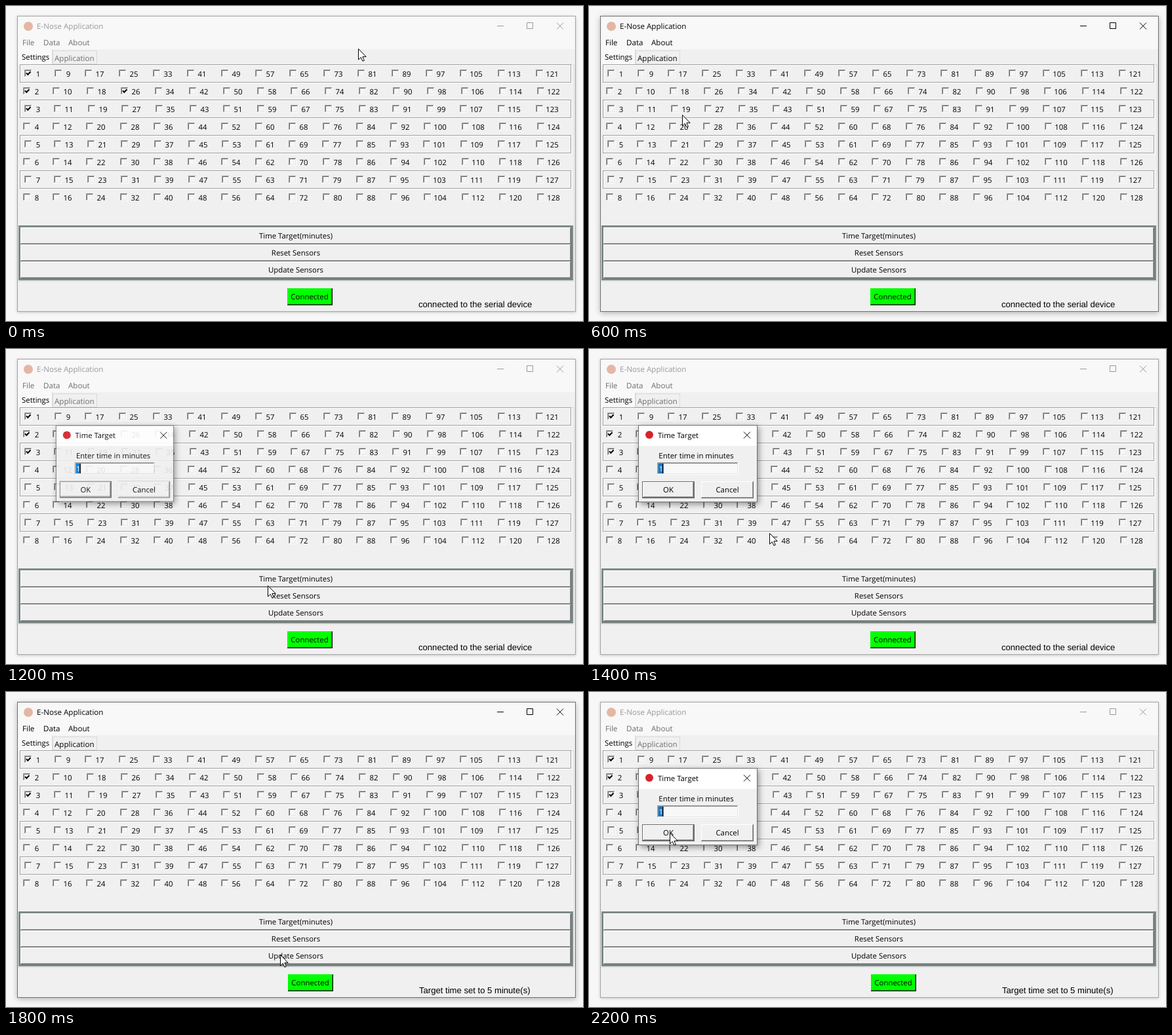
Write an HTML page that moves like this. It is 880 px wide and 481 px high and loops after 2400 ms.

```html
<!DOCTYPE html>
<html lang="en">
<head>
<meta charset="utf-8">
<title>E-Nose Application</title>
<style>
  html, body { margin: 0; width: 100%; height: 100%; overflow: hidden; background: #f7f7f7; }
  svg { display: block; width: 880px; height: 481px; }
  text {
    font: 11.4px "Open Sans", "Noto Sans", sans-serif;
    fill: #000; white-space: pre; text-rendering: geometricPrecision;
  }
  #frame { fill: #f0f0f0; stroke: #6e6e6e; filter: drop-shadow(0 2px 4px rgba(0,0,0,.28)); }
  .inactive #frame { stroke: #a4a4a4; filter: drop-shadow(0 1px 2px rgba(0,0,0,.2)); }
  .title, .menu { font-size: 11.6px; }
  .inactive .title { fill: #999; }
  .inactive .menu { fill: #6d6d6d; }
  .middle { text-anchor: middle; }
  .glyph { fill: none; stroke: #000; }
  .inactive .glyph { stroke: #999; }
  #popup { filter: drop-shadow(2px 3px 5px rgba(0,0,0,.42)); }
  .status { font: 13.1px "Liberation Sans", Arial, sans-serif; }
</style>
</head>
<body>
<svg id="stage" viewBox="0 0 880 481"></svg>
<script>
const NS = "http://www.w3.org/2000/svg";
const stage = document.getElementById("stage");

function add(parent, tag, attrs, content) {
  const node = document.createElementNS(NS, tag);
  for (const key in attrs) node.setAttribute(key, attrs[key]);
  if (content !== undefined) node.textContent = content;
  parent.appendChild(node);
  return node;
}
const rect = (p, x, y, width, height, fill, more) =>
  add(p, "rect", { x, y, width, height, fill, ...more });
const label = (p, x, y, str, name = "") => add(p, "text", { x, y, class: name }, str);
const line = (p, d, stroke, width = 1) =>
  add(p, "path", { d, stroke, fill: "none", "stroke-width": width });

// Two-pixel bevel: light and dark edges around a flat face.
function bevel(p, x, y, w, h, face, light, dark, shade) {
  rect(p, x, y, w, h, dark);
  rect(p, x, y, w - 1, h - 1, light);
  rect(p, x + 1, y + 1, w - 2, h - 2, shade);
  rect(p, x + 1, y + 1, w - 3, h - 3, face);
}

function button(p, x, y, w, h, str) {
  bevel(p, x, y, w, h, "#f0f0f0", "#fff", "#696969", "#a0a0a0");
  label(p, x + w / 2, y + h / 2 + 4, str, "middle");
}

function checkbox(p, x, y) {
  bevel(p, x, y, 12, 12, "#f6f6f6", "#a0a0a0", "#fdfdfd", "#e6e6e6");
  line(p, `M${x + 1.5} ${y + 10}V${y + 1.5}H${x + 10}`, "#696969");
  return line(p, `M${x + 3} ${y + 5.2}l2.3 2.5l4.2 -4.4`, "#000", 2);
}

// Main window
const win = add(stage, "g", {});
rect(win, 17.5, 15.5, 851, 451, "#f0f0f0", { id: "frame" });
rect(win, 18, 16, 850, 50, "#f8f8f8");
add(win, "circle", { cx: 34, cy: 31, r: 7, fill: "#e3b7a4" });
label(win, 47, 35, "E-Nose Application", "title");
add(win, "path", { class: "glyph", d: "M749 30.5h10M794.5 25.5h9v9h-9zM840 25.5l10 10M850 25.5l-10 10" });
[[25, "File"], [57, "Data"], [95, "About"]].forEach(([x, s]) => label(win, x, 60, s, "menu"));

// Tabs and pane
line(win, "M18 89.5H866.5V420.5H18", "#dcdcdc");
rect(win, 71.5, 68.5, 67, 20, "#f0f0f0", { stroke: "#d9d9d9" });
rect(win, 18, 66, 53, 24, "#f9f9f9");
line(win, "M70.5 66V89", "#d9d9d9");
label(win, 24, 82, "Settings");
label(win, 74, 84, "Application", "menu");

// Sensor grid: each row spreads its cells evenly between fixed ends.
const ticks = {};
for (let row = 0; row < 8; row++) {
  const boxed = row % 2 === 0;
  const top = 97 + row * 27;
  if (boxed) {
    rect(win, 22.5, top - 6.5, 840, 27, "none", { stroke: "#fff" });
    rect(win, 21.5, top - 7.5, 840, 27, "none", { stroke: "#a0a0a0" });
  }
  const ids = Array.from({ length: 16 }, (_, col) => row + 1 + col * 8);
  const digits = id => String(id).length;
  const start = boxed ? 28 : 26, end = boxed ? 808 : 810;
  const used = ids.slice(0, 15).reduce((sum, id) => sum + digits(id) * 6, 0);
  const gap = (end - start - used) / 15;
  let x = start;
  for (const id of ids) {
    const left = Math.floor(x + 0.01);
    ticks[id] = checkbox(win, left, top);
    label(win, left + 19 + digits(id) * 2, top + 11, id, "middle");
    x += gap + digits(id) * 6;
  }
}

// Action buttons
rect(win, 19, 335, 846, 84, "#7b8a89");
["Time Target(minutes)", "Reset Sensors", "Update Sensors"].forEach((s, i) =>
  button(win, 22, 338 + i * 26, 840, 26, s));

// Status area
const badge = add(win, "g", {});
bevel(badge, 429, 431, 69, 26, "#00ff00", "#00ff00", "#000", "#009900");
label(badge, 463, 448, "Connected", "middle");
const status = label(win, 629, 460, "", "status");

// Popup
const popup = add(stage, "g", { id: "popup" });
rect(popup, 75.5, 116.5, 181, 117, "#f0f0f0", { stroke: "#707070" });
rect(popup, 76, 117, 180, 31, "#fff");
add(popup, "circle", { cx: 92, cy: 131, r: 6, fill: "#d9232b" });
label(popup, 105, 136, "Time Target");
line(popup, "M236 126.5l10 10M246 126.5l-10 10", "#000");
label(popup, 163.5, 167, "Enter time in minutes", "middle");
bevel(popup, 104, 173, 124, 19, "#f8f8f8", "#a0a0a0", "#fff", "#e3e3e3");
line(popup, "M105.5 190V174.5H226", "#8a8a8a");
rect(popup, 106, 175, 7, 15, "#0078d7");
label(popup, 106.5, 187, "1").style.fill = "#fff";
rect(popup, 112, 175, 1.5, 15, "#000");
rect(popup, 81, 202, 80, 26, "#6b6b6b");
button(popup, 82, 203, 78, 24, "OK");
button(popup, 171, 202, 80, 26, "Cancel");

const pointer = add(stage, "path", {
  d: "M.5 .5V17L4.3 13.4L7 19.2L9.4 18.1L6.9 12.4H12.2Z",
  fill: "#fff", stroke: "#000", "stroke-linejoin": "round"
});

// Steps: pointer x, y, active window, ticked sensors, popup opacity, target set
const STEP = 200;
const four = [1, 2, 3, 26], three = [1, 2, 3];
const steps = [
  [537, 65, 0, four, 0, 0],
  [505, 215, 0, four, 0, 0],
  [446, 372, 0, four, 0, 0],
  [142, 166, 1, [], 0, 0],
  [34, 158, 1, three, 0, 0],
  [475, 360, 1, three, 0, 0],
  [399, 361, 0, three, 0.9, 0],
  [275, 281, 0, three, 1, 0],
  [148, 200, 0, three, 1, 0],
  [418, 401, 1, three, 0, 1],
  [420, 350, 1, three, 0, 1],
  [123, 215, 0, three, 1, 1]
];

let shown = -1;
function show(index) {
  const [x, y, active, ticked, opacity, set] = steps[index];
  pointer.setAttribute("transform", `translate(${x} ${y})`);
  win.setAttribute("class", active ? "" : "inactive");
  for (const id in ticks) ticks[id].style.display = ticked.includes(+id) ? "" : "none";
  popup.style.display = opacity ? "" : "none";
  popup.style.opacity = opacity;
  popup.setAttribute("transform", opacity < 1 ? "translate(1.65 1.75) scale(.99)" : "");
  badge.setAttribute("transform", `translate(${set} 0)`);
  status.setAttribute("x", 629 + set);
  status.textContent = set ? "Target time set to 5 minute(s)" : "connected to the serial device";
}

const begin = performance.now();
function tick() {
  const index = Math.floor((performance.now() - begin) / STEP) % steps.length;
  if (index !== shown) show(shown = index);
  requestAnimationFrame(tick);
}
tick();
</script>
</body>
</html>
```
